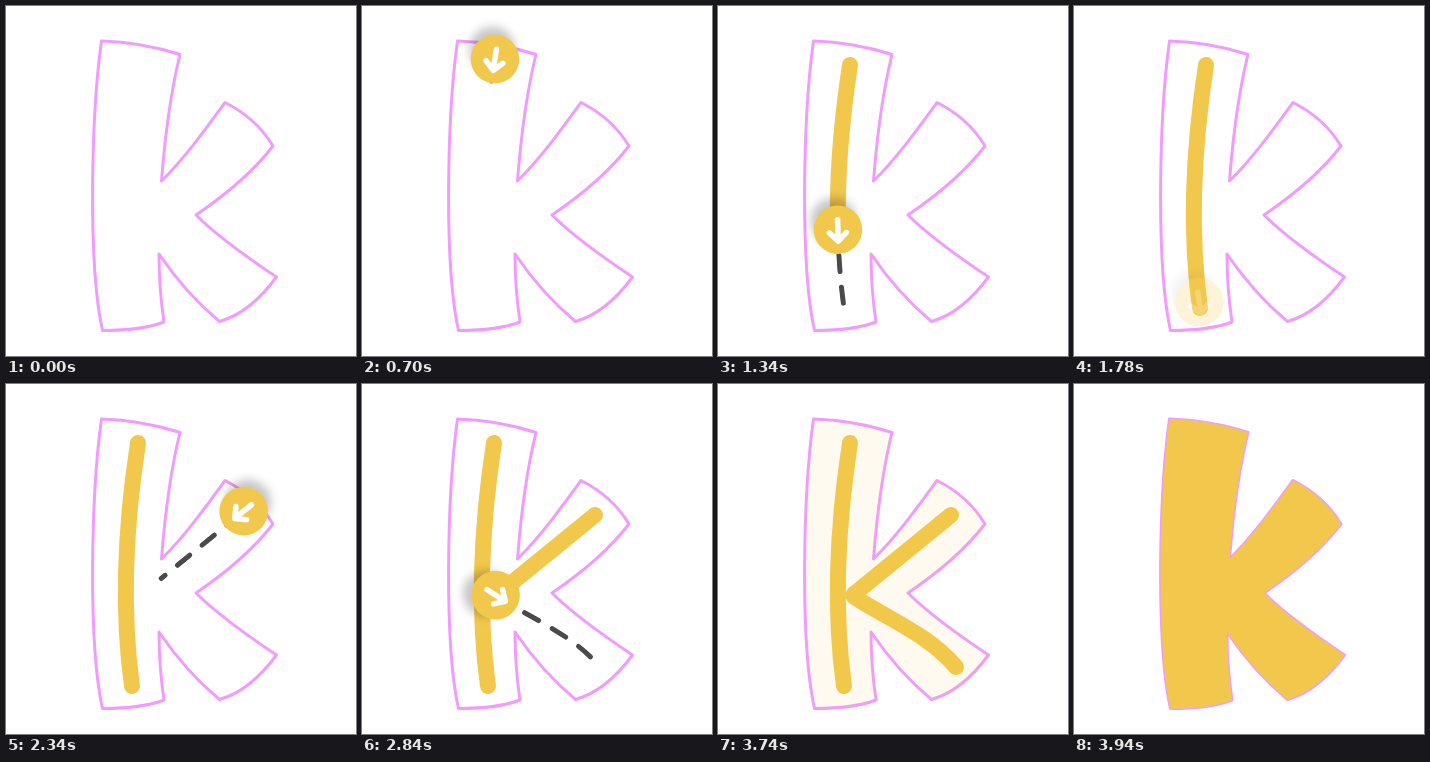
An HTML page without scripts for the animation above (6 s loop, 350 by 350 pixels).

```html
<!DOCTYPE html>
<html lang="en">
<head>
<meta charset="utf-8">
<title>Tracing the letter k</title>
<style>
  html, body { margin: 0; width: 100%; height: 100%; overflow: hidden; background: #fff; }
  svg { display: block; width: 100%; height: 100%; }
  path, use { stroke-linejoin: round; stroke-linecap: round; }
  .outline { fill: none; stroke: #f19bff; stroke-width: 3; }
  .guide { fill: none; stroke: #4a4a4a; stroke-width: 5; stroke-dasharray: 16 16; }
  .reveal { fill: none; stroke: #fff; stroke-width: 6; }
  .trace { fill: none; stroke: #f2c84c; stroke-width: 16; }
  .one { stroke-dasharray: 245 600; }
  .two { stroke-dasharray: 254 600; }
  .arrow { fill: none; stroke: #fff; stroke-width: 5.5; }
</style>
</head>
<body>
<svg viewBox="0 0 350 350">
  <defs>
    <path id="letter" d="M95.5 35Q135 36 174 48.5C165 85 159 130 155.5 175C178 153 199 124 219 96.5Q250 112 267 140C247 166 218 190 190 209C213 232 242 252 270.5 271Q244 307 213.5 315.5C190 296 170 273 153 248C153 272 155 296 158 316C140 323 118 324.5 96.5 324.5C82 260 85 110 95.5 35Z"/>
    <path id="stem" pathLength="245" d="M132 59C118 150 116 230 126 302"/>
    <path id="arms" pathLength="254" d="M233 131L138 208.5Q133 211 138 214C172 236 211 251 238 283"/>

    <filter id="blur" x="-60%" y="-60%" width="220%" height="220%">
      <feGaussianBlur stdDeviation="5"/>
    </filter>

    <!-- Points along +x; sits slightly behind the traced point -->
    <g id="ball">
      <circle cx="-15" cy="4" r="23" opacity=".22" filter="url(#blur)"/>
      <circle cx="-6" r="24.3" fill="#f2c84c"/>
      <path class="arrow" d="M-16 0H5M-3 -8.5L5.5 0L-3 8.5"/>
    </g>

    <mask id="stemMask" maskUnits="userSpaceOnUse" x="0" y="0" width="350" height="350">
      <use href="#stem" class="reveal one" stroke-dashoffset="248">
        <animate attributeName="stroke-dashoffset" dur="6s" repeatCount="indefinite"
          values="248;248;0;0" keyTimes="0;.11083;.18083;1"/>
      </use>
    </mask>
    <mask id="armsMask" maskUnits="userSpaceOnUse" x="0" y="0" width="350" height="350">
      <use href="#arms" class="reveal two" stroke-dashoffset="257">
        <animate attributeName="stroke-dashoffset" dur="6s" repeatCount="indefinite"
          values="257;257;0;0" keyTimes="0;.36;.435;1"/>
      </use>
    </mask>
  </defs>

  <use href="#letter" class="outline"/>

  <g mask="url(#stemMask)"><use href="#stem" class="guide"/></g>
  <g mask="url(#armsMask)"><use href="#arms" class="guide"/></g>

  <use href="#stem" class="trace one" stroke-dashoffset="248">
    <animate attributeName="stroke-dashoffset" dur="6s" repeatCount="indefinite" calcMode="spline"
      values="248;248;0;0" keyTimes="0;.18083;.25083;1" keySplines="0 0 1 1;.455 .03 .515 .955;0 0 1 1"/>
  </use>
  <use href="#arms" class="trace two" stroke-dashoffset="257">
    <animate attributeName="stroke-dashoffset" dur="6s" repeatCount="indefinite" calcMode="spline"
      values="257;257;0;0" keyTimes="0;.43833;.50833;1" keySplines="0 0 1 1;.455 .03 .515 .955;0 0 1 1"/>
  </use>

  <g opacity="0">
    <use href="#ball"/>
    <animateMotion dur="6s" repeatCount="indefinite" rotate="auto" calcMode="spline"
      keyPoints="0;0;1;1" keyTimes="0;.18083;.25083;1" keySplines="0 0 1 1;.455 .03 .515 .955;0 0 1 1">
      <mpath href="#stem"/>
    </animateMotion>
    <animate attributeName="opacity" dur="6s" repeatCount="indefinite"
      values="0;0;1;1;0;0" keyTimes="0;.005;.03167;.27833;.30167;1"/>
  </g>
  <g opacity="0">
    <use href="#ball"/>
    <animateMotion dur="6s" repeatCount="indefinite" rotate="auto" calcMode="spline"
      keyPoints="0;0;1;1" keyTimes="0;.43833;.50833;1" keySplines="0 0 1 1;.455 .03 .515 .955;0 0 1 1">
      <mpath href="#arms"/>
    </animateMotion>
    <animate attributeName="opacity" dur="6s" repeatCount="indefinite"
      values="0;0;1;1;0;0" keyTimes="0;.33167;.35833;.565;.59417;1"/>
  </g>

  <use href="#letter" fill="#f2c84c" opacity="0">
    <animate attributeName="opacity" dur="6s" repeatCount="indefinite"
      values="0;0;1;1" keyTimes="0;.62033;.65667;1"/>
  </use>
</svg>
</body>
</html>
```
